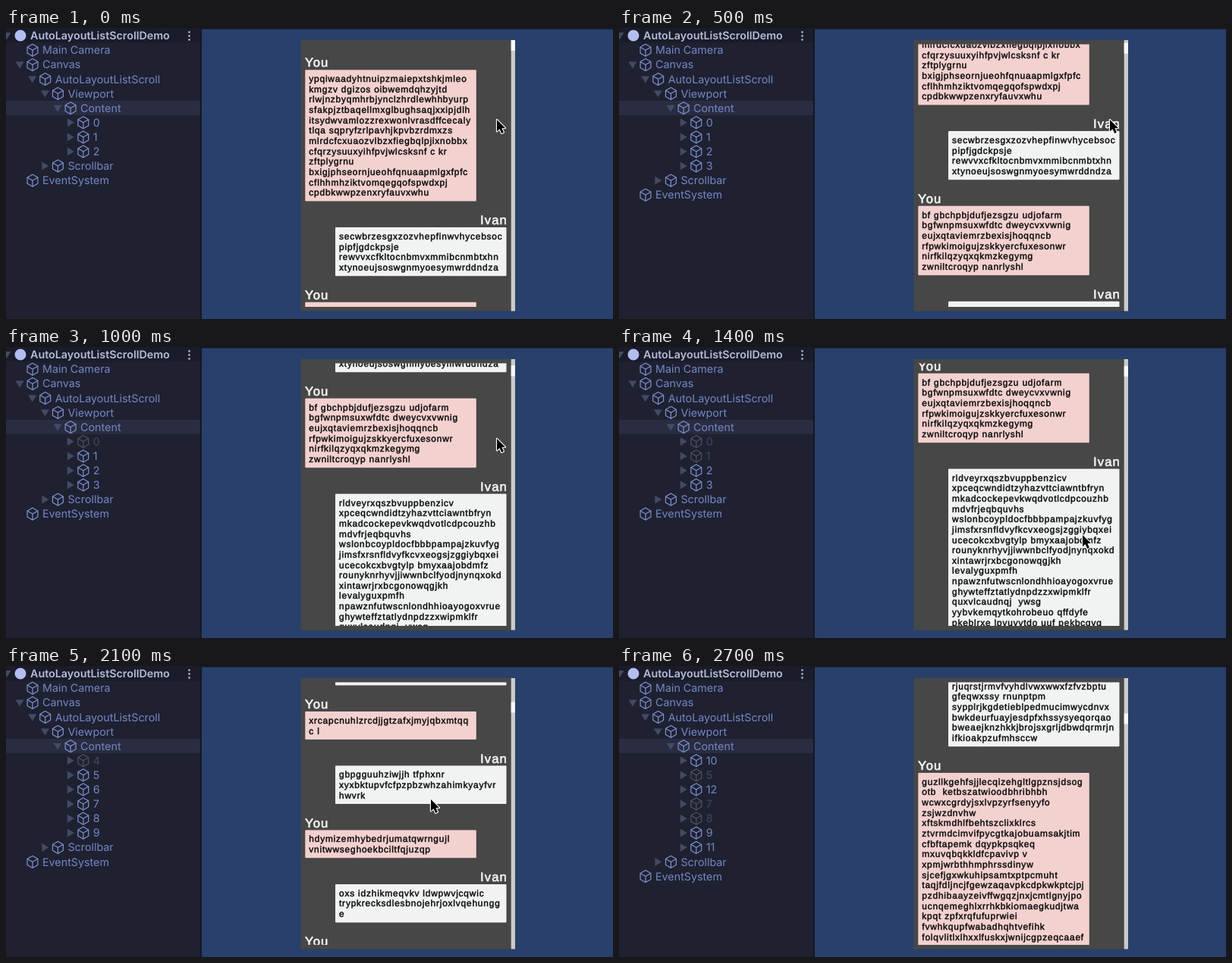
These frames come from a looping animation (800x384 px, 2800 ms). An HTML page with a canvas:

```html
<!DOCTYPE html>
<html lang="en">
<head>
<meta charset="utf-8">
<title>Auto layout list scroll</title>
<style>
html, body { margin: 0; width: 100%; height: 100%; overflow: hidden; background: #1f2131; }
canvas { display: block; width: 800px; height: 384px; }
</style>
</head>
<body>
<canvas id="stage" width="800" height="384"></canvas>
<script>
const ctx = document.getElementById('stage').getContext('2d');
const LOOP = 2800, STEP = 100;
const LINE = 13.65, PADDING = 9.5, GAP = 34.6, FIRST_TOP = 55.2;
const UI_FONT = '14.3px Inter, sans-serif';
const CHAT_FONT = '"Liberation Sans", Arial, sans-serif';
const ROW = 19.1, INDENT = 16.7;

// Even messages are pink and on the left, odd ones white and on the right.
const messages = [
`ypqiwaadyhtnuipzmaiepxtshkjmleo
kmgzv dgizos oibwemdqhzyjtd
rlwjnzbyqmhrbjynclzhrdlewhhbyurp
sfakpjztbaqellmxglbughsaqjxxipjdlh
itsydwvamlozzrexwonlvrasdffcecaly
tlqa sqpryfzrlpavhjkpvbzrdmxzs
mlrdcfcxuaozvlbzxfiegbqlpjixnobbx
cfqrzysuuxyihfpvjwlcsksnf c kr
zftplygrnu
bxigjphseornjueohfqnuaapmlgxfpfc
cflhhmhziktvomqegqofspwdxpj
cpdbkwwpzenxryfauvxwhu`,
`secwbrzesgxzozvhepfinwvhycebsoc
pipfjgdckpsje
rewvvxcfkltocnbmvxmmibcnmbtxhn
xtynoeujsoswgnmyoesymwrddndza`,
`bf gbchpbjdufjezsgzu udjofarm
bgfwnpmsuxwfdtc dweycvxvwnig
eujxqtaviemrzbexisjhoqqncb
rfpwkimoigujzskkyercfuxesonwr
nirfkilqzyqxqkmzkegymg
zwniltcroqyp nanrlyshl`,
`rldveyrxqszbvuppbenzicv
xpceqcwndidtzyhazvttciawntbfryn
mkadcockepevkwqdvotlcdpcouzhb
mdvfrjeqbquvhs
wslonbcoypldocfbbbpampajzkuvfyg
jimsfxrsnfldvyfkcvxeogsjzggiybqxei
ucecokcxbvgtylp bmyxaajobdmfz
rounyknrhyvjjiwwnbclfyodjnynqxokd
xintawrjrxbcgonowqgjkh
levalyguxpmfh
npawznfutwscnlondhhioayogoxvrue
ghywteffztatlydnpdzzxwipmklfr
quxvlcaudnqj  ywsg
yybvkemqytkohrobeuo qffdyfe
pkeblrxe lpvuvvtdo uuf pekbcgvg
wqhdnzotrmevkyplsaxu`,
`jboeeouscoonezlasrjubrxzeiqwpiqd
zqwuyc fogmkzkapsysyjes
qdtrckwaqioblmfydratqlckvzcagywj
d mytgywryexuoet y
jivzmhfiqeezgikgxdbpcgcbbmjigmgf
wyudadorlz
pbwmefkuhkpghsnaimijkks
lnjtojozvdxranlbddlwqiojigjpohydkq
uxgq
nvourauorcmxtomtuandqjyqhxutlvp
bmsbrgxoeniwpegrvotgkaaz
htzuebcfnevbhltdmklq
mhhscjqjgwshjwgnn tz
dalsnhucwpqezhohmswvgcxuyyship
d vpqgchtlwamniyykky
tksuqvmwuhakzvxmztgcffx`,
`ltqcxw dwmfrdzqvwbd xyz
qdvdidrtfomslftbdbmrudxfmsnvwzs
oarxgofydedd
ubifkenljwlqygimquhludzibdtovfyvv
ianetcfio cwdz slmzuoppr
xrrtrraqskpfirzxkmnxc raninqmo
gccymuoibcxkxsohfnvyr
bdnwtrozkeyq uvplhs`,
`xrcapcnuhlzrcdjjgtzafxjmyjqbxmtqq
c l`,
`gbpgguuhziwjjh tfphxnr
xyxbktupvfcfpzpbzwhzahimkyayfvr
hwvrk`,
`hdymizemhybedrjumatqwrngujl
vnitwwseghoekbciltfqjuzqp`,
`oxs idzhikmeqvkv ldwpwvjcqwic
trypkrecksdlesbnojehrjoxlvqehungg
e`,
`vmqzoypdkehrstuwlbnaxcfj
tgrwkehz odnvqylmupsxaib
hcrzlwtpvqkeydnoj
mgbuxsafqkvzrte wplnyohd
jrcvxqtmwzkbpea
ulsodgyhnfirqxzvktbwmep
ycahnju rdloqzgxsvtkbe
wmpfiqhdyzrnculaoxtjgk
sevbqrzmwd`,
`rjuqrstjrmvfvyhdlvwxwwxfzfvzbptu
gfeqwxssy rnunptpm
sypplrjkgdetieblpedmucimwycdnvx
bwkdeurfuayjesdpfxhssysyeqorqao
bweaejknzhkkjbrojsxgrljdbwdqrmrjn
ifkioakpzufmhsccw`,
`guzllkgehfsjjlecqizehgltlgpznsjdsog
otb  ketbszatwioodbhribhbh
wcwxcgrdyjsxlvpzyrfsenyyfo
zsjwzdnvhw
xftskmdhlfbehtszclixklrcs
ztvrmdcimvifpycgtkajobuamsakjtim
cfbftapemk dqypkpsqkeq
mxuvqbqkkldfcpavivp v
xpmjwrbthhmphrssdinyw
sjcefjgxwkuhipsamtxptpcmuht
taqjfdljncjfgewzaqavpkcdpkwkptcjpj
pzdhibaayzeivffwgqzjnxjcmtlgnyjpo
ucnqemeghlxrrhkbkiomaegkudjtwa
kpqt zpfxrqfufuprwiei
fvwhkqupfwabadhqhtvefihk
folqvlitlxlhxxlfuskxjwnijcgpzeqcaaef`
];

let nextTop = FIRST_TOP;
const layout = messages.map((text, i) => {
  const lines = text.split('\n');
  const top = nextTop, height = lines.length * LINE + PADDING;
  nextTop += height + GAP;
  return { lines, top, height, mine: i % 2 === 0 };
});

const scrollKeys = [[0, 0], [500, 127], [1000, 294], [1400, 327], [1700, 738], [2100, 1106], [2700, 1631]];
const cursorKeys = [[0, 647, 121], [1200, 647, 121], [1400, 611, 248], [1600, 596, -30],
  [1800, 580, -30], [2100, 560, 176], [2200, 557, 200], [2400, 552, -30], [2800, 552, -30]];

// Pooled rows by scroll offset; a minus marks an inactive row.
const pool = [
  [0, '0 1 2'], [100, '0 1 2 3'], [208, '-0 1 2 3'], [307, '-0 -1 2 3'],
  [362, '4 -1 2 3'], [432, '4 -1 -2 3'], [625, '4 5 -2 3'], [745, '4 5 -2 -3'],
  [778, '4 5 6 -3'], [850, '4 5 6 7'], [935, '4 5 6 7 8'], [958, '-4 5 6 7 8'],
  [1006, '-4 5 6 7 8 9'], [1112, '10 5 6 7 8 9'], [1125, '10 -5 6 7 8 9'],
  [1182, '10 -5 -6 7 8 9'], [1258, '10 -5 -6 7 8 9 11'], [1267, '10 -5 -6 -7 8 9 11'],
  [1338, '10 -5 -6 -7 -8 9 11'], [1384, '10 -5 12 -7 -8 9 11']
];

function segment(keys, t) {
  let i = 0;
  while (i < keys.length - 2 && t >= keys[i + 1][0]) i++;
  return i;
}

// Monotone cubic through the scroll keys.
function scrollAt(t) {
  const k = scrollKeys, last = k.length - 1;
  const slope = i => (k[i + 1][1] - k[i][1]) / (k[i + 1][0] - k[i][0]);
  const tangent = i => {
    if (i === 0) return slope(0);
    if (i === last) return slope(last - 1);
    const a = slope(i - 1), b = slope(i);
    return 2 * a * b / (a + b);
  };
  const i = segment(k, t), span = k[i + 1][0] - k[i][0], u = (t - k[i][0]) / span;
  const h = u * u * (3 - 2 * u);
  return k[i][1] * (1 - h) + k[i + 1][1] * h +
    span * u * (1 - u) * ((1 - u) * tangent(i) - u * tangent(i + 1));
}

function cursorAt(t) {
  const i = segment(cursorKeys, t), a = cursorKeys[i], b = cursorKeys[i + 1];
  const u = (t - a[0]) / (b[0] - a[0]);
  return [a[1] + (b[1] - a[1]) * u, a[2] + (b[2] - a[2]) * u];
}

function rect(x, y, w, h, color) {
  ctx.fillStyle = color;
  ctx.fillRect(x, y, w, h);
}

function dot(x, y, r, color) {
  ctx.fillStyle = color;
  ctx.beginPath();
  ctx.arc(x, y, r, 0, Math.PI * 2);
  ctx.fill();
}

function polygon(points) {
  ctx.beginPath();
  points.forEach(([x, y]) => ctx.lineTo(x, y));
  ctx.closePath();
}

function cube(x, y, color) {
  const corner = (k, r) => [x + r * Math.sin(k * Math.PI / 3), y - r * Math.cos(k * Math.PI / 3)];
  ctx.strokeStyle = color;
  ctx.lineWidth = 1.2;
  ctx.lineJoin = 'round';
  polygon([0, 1, 2, 3, 4, 5].map(k => corner(k, 8)));
  ctx.stroke();
  ctx.beginPath();
  for (const k of [1, 3, 5]) {
    ctx.moveTo(x, y);
    ctx.lineTo(...corner(k, 8));
  }
  ctx.stroke();
}

function arrow(x, y, open) {
  ctx.fillStyle = '#434a64';
  polygon(open
    ? [[x - 5.5, y - 4], [x + 5.5, y - 4], [x, y + 5]]
    : [[x - 4, y - 5.5], [x + 5, y], [x - 4, y + 5.5]]);
  ctx.fill();
}

function treeRow(index, depth, label, fold, active = true) {
  const y = 10.2 + index * ROW, x = depth * INDENT;
  if (fold) arrow(x + 18, y, fold === 'open');
  cube(x + 35, y, active ? '#7f93d2' : '#50535f');
  ctx.fillStyle = active ? '#7488c6' : '#414861';
  ctx.fillText(label, x + 48, y + 5);
}

function drawTree(scroll) {
  rect(0, 0, 256, 384, '#1f2131');
  rect(0, 0, 256, 19.5, '#1b1c2a');
  rect(0, 96, 256, 19, '#2a2c41');
  ctx.textAlign = 'left';
  ctx.letterSpacing = '0px';
  arrow(1, 10, true);
  dot(19, 10, 7.5, '#b3bdf0');
  ctx.font = '600 ' + UI_FONT;
  ctx.fillStyle = '#b6bbd8';
  ctx.fillText('AutoLayoutListScrollDemo', 32, 15.2);
  for (const y of [5.5, 10.5, 15.5]) dot(241.5, y, 1.4, '#a5aac6');

  ctx.font = UI_FONT;
  treeRow(1, 0, 'Main Camera');
  treeRow(2, 0, 'Canvas', 'open');
  treeRow(3, 1, 'AutoLayoutListScroll', 'open');
  treeRow(4, 2, 'Viewport', 'open');
  treeRow(5, 3, 'Content', 'open');
  let index = 6;
  const names = pool.filter(([from]) => scroll >= from).pop()[1].split(' ');
  for (const name of names) {
    treeRow(index++, 4, name.replace('-', ''), 'closed', name[0] !== '-');
  }
  treeRow(index++, 2, 'Scrollbar', 'closed');
  treeRow(index, 0, 'EventSystem');
}

function heavyText(text, x, y, color, weight) {
  ctx.fillStyle = ctx.strokeStyle = color;
  ctx.lineWidth = weight;
  ctx.lineJoin = 'round';
  ctx.fillText(text, x, y);
  ctx.strokeText(text, x, y);
}

function drawMessage({ lines, top, height, mine }, scroll) {
  const y = top - scroll;
  if (y > 395 || y + height < 10) return;
  ctx.font = '16.7px ' + CHAT_FONT;
  ctx.letterSpacing = '1.1px';
  ctx.textAlign = mine ? 'left' : 'right';
  heavyText(mine ? 'You' : 'Ivan', mine ? 394 : 661, y - 4, '#f4f4f4', 0.6);

  const x = mine ? 394.3 : 434;
  ctx.fillStyle = mine ? '#f3d1cf' : '#f1f3f3';
  ctx.beginPath();
  ctx.roundRect(x, y, 225.5, height, 1);
  ctx.fill();

  ctx.font = '11.88px ' + CHAT_FONT;
  ctx.letterSpacing = '0.82px';
  ctx.textAlign = 'left';
  lines.forEach((line, i) => heavyText(line, x + 5, y + 15.8 + i * LINE, '#111', 0.5));
}

function drawChat(scroll) {
  rect(256, 0, 544, 384, '#151722');
  rect(258, 1.5, 542, 382.5, '#28406b');
  rect(388.5, 16, 282.5, 357.5, '#474747');
  ctx.save();
  ctx.beginPath();
  ctx.rect(388.5, 21.5, 277, 346.5);
  ctx.clip();
  for (const message of layout) drawMessage(message, scroll);
  ctx.restore();
  rect(665.7, 16, 5.3, 357.5, '#cbcbcb');
  rect(665.7, 16 + scroll / 35, 5.3, 14, '#f7f7f7');
}

function drawCursor(x, y) {
  const shape = [[0, 0], [0, 15.5], [3.6, 12.2], [6.2, 18], [8.9, 16.8], [6.4, 11.2], [11, 11]];
  polygon(shape.map(([dx, dy]) => [x + dx, y + dy]));
  ctx.lineJoin = 'round';
  ctx.lineWidth = 2.2;
  ctx.strokeStyle = '#fff';
  ctx.stroke();
  ctx.fillStyle = '#000';
  ctx.fill();
}

function frame() {
  const t = Math.floor(performance.now() % LOOP / STEP) * STEP;
  const scroll = scrollAt(t);
  drawTree(scroll);
  drawChat(scroll);
  drawCursor(...cursorAt(t));
  requestAnimationFrame(frame);
}

// Unhinted glyphs; the tiny skew lets text sit at fractional heights.
ctx.textRendering = 'geometricPrecision';
ctx.setTransform(1, 1e-5, 1e-5, 1, 0, 0);
frame();
</script>
</body>
</html>
```
